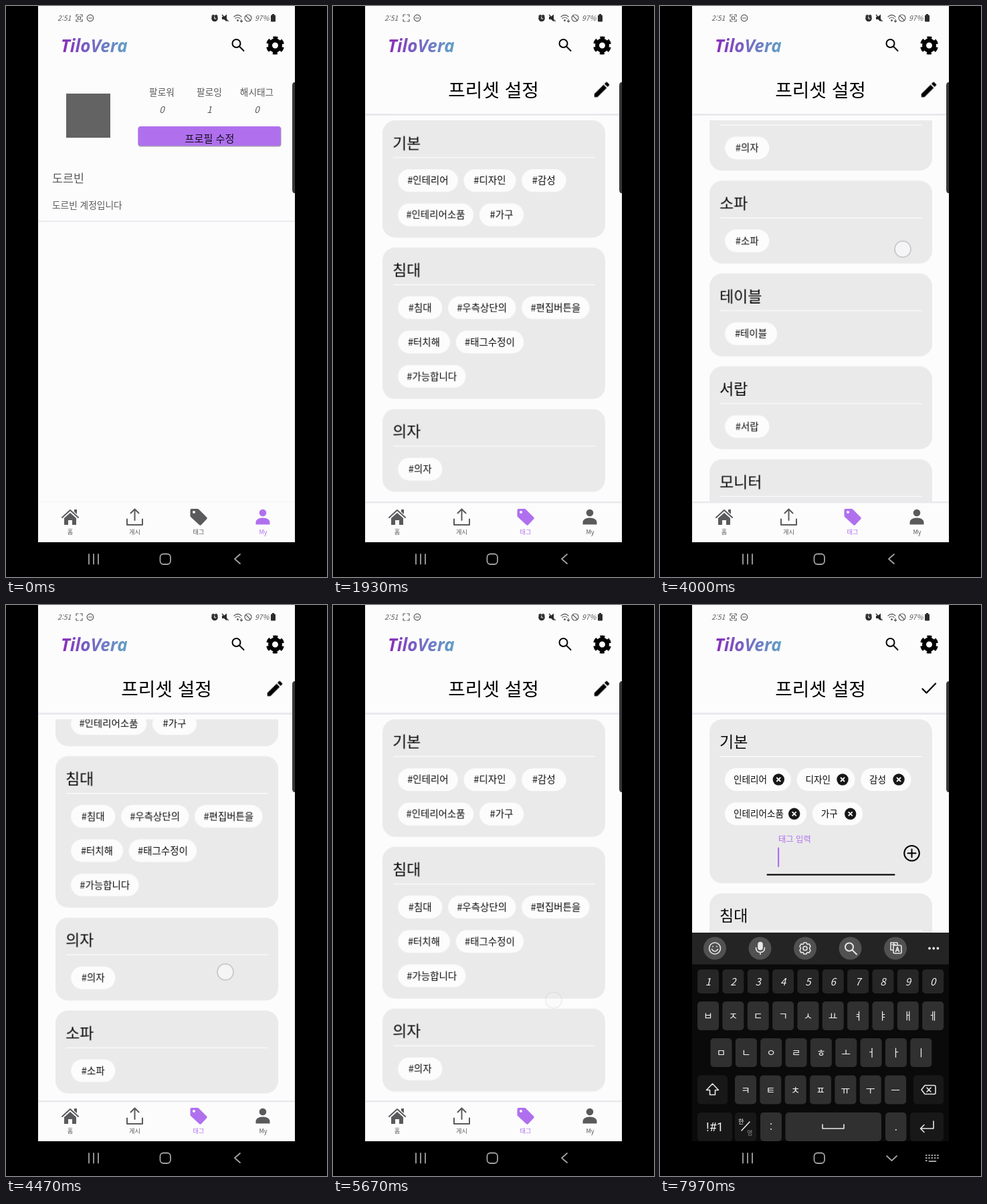
Animation, 480 px wide and 854 px high, one loop 8000 ms. Source, as an HTML page:

```html
<!DOCTYPE html>
<html lang="ko">
<head>
<meta charset="utf-8">
<title>Preset tags</title>
<style>
:root { --bg: #fcfcfd; --card: #eaeaea; --line: #e9e9ee; --gray: #5a5a5c; --ink: #0a0a0a; --purple: #b070ee; --pale: #e8e8e8; }
html, body { margin: 0; width: 100%; height: 100%; overflow: hidden; background: #000; }
svg { display: block; width: 100vw; height: 100vh; }
text { font-family: "Noto Sans CJK KR", "Noto Sans CJK", "Noto Sans", sans-serif; }
.mid { text-anchor: middle; }
.line { fill: none; stroke: currentColor; stroke-width: 2; stroke-linecap: round; stroke-linejoin: round; }
.gray { color: var(--gray); fill: var(--gray); }
.brand { font: italic 700 26px "Open Sans", sans-serif; }
.s9 { font-size: 9.2px; }
.s12 { font-size: 12.3px; }
.s14 { font-size: 13.7px; }
.s15 { font-size: 15.2px; }
.s17 { font-size: 17.4px; }
.s28 { font-size: 27.8px; }
.chip { font-size: 14.5px; }
.edit .chip { font-size: 13.6px; }
.name { font-size: 23px; }
.s28, .name { font-weight: 500; }
.num { font-style: italic; }
.key { font-size: 15px; text-anchor: middle; }
.tab { fill: currentColor; color: var(--gray); }

/* hard switches */
.profile, .preset, .view, .editing, .late, .early, .tag, .my { animation: 8s step-end infinite; }
.profile { animation-name: leave; }
.preset { animation-name: enter; }
.view { animation-name: viewOut; }
.editing { animation-name: editIn; }
.early { animation-name: navOut; }
.late { animation-name: navIn; }
.tag { animation-name: tabOn; }
.my { animation-name: tabOff; }
.rec { animation: rec 1s step-end infinite; }
@keyframes leave { 0% { opacity: 1 } 8%, 100% { opacity: 0 } }
@keyframes enter { 0% { opacity: 0 } 8%, 100% { opacity: 1 } }
@keyframes viewOut { 0% { opacity: 1 } 95%, 100% { opacity: 0 } }
@keyframes editIn { 0% { opacity: 0 } 95%, 100% { opacity: 1 } }
@keyframes navOut { 0% { opacity: 1 } 97%, 100% { opacity: 0 } }
@keyframes navIn { 0% { opacity: 0 } 97%, 100% { opacity: 1 } }
@keyframes tabOn { 0% { color: var(--gray) } 8%, 100% { color: var(--purple) } }
@keyframes tabOff { 0% { color: var(--purple) } 8%, 100% { color: var(--gray) } }
@keyframes rec { 0% { opacity: 1 } 43% { opacity: 0 } 95%, 100% { opacity: 1 } }

.scroll { animation: scroll 8s linear infinite; }
@keyframes scroll {
  0%, 35% { transform: translateY(0) }
  38% { transform: translateY(-40px) }
  40.875% { transform: translateY(-110px) }
  42.5% { transform: translateY(-205px) }
  44.5% { transform: translateY(-310px) }
  48% { transform: translateY(-404px) }
  50% { transform: translateY(-480px) }
  50.5% { transform: translateY(-496px) }
  51.5% { transform: translateY(-484px) }
  53.5% { transform: translateY(-330px) }
  55.875% { transform: translateY(-136px) }
  57% { transform: translateY(-55px) }
  59%, 100% { transform: translateY(0) }
}
.stretch { transform-origin: 0 171px; animation: stretch 8s linear infinite; }
@keyframes stretch {
  0%, 66.5% { transform: scaleY(1) }
  69% { transform: scaleY(1.012) }
  70.875% { transform: scaleY(1.002) }
  71.5%, 100% { transform: scaleY(1) }
}
.touch { opacity: 0; animation: touch 8s linear infinite; }
@keyframes touch {
  0%, 5.8% { transform: translate(288px, 766px); opacity: 0 }
  6%, 8% { transform: translate(288px, 766px); opacity: 1 }
  10% { transform: translate(288px, 766px); opacity: 0 }
  33% { transform: translate(367px, 475px); opacity: 0 }
  33.4%, 35% { transform: translate(367px, 475px); opacity: 1 }
  38% { transform: translate(366px, 435px); opacity: 1 }
  40.875% { transform: translate(364px, 365px); opacity: 1 }
  42.5% { transform: translate(363px, 270px); opacity: 1 }
  43.4% { transform: translate(363px, 260px); opacity: 0 }
  47.8% { transform: translate(361px, 440px); opacity: 0 }
  48% { transform: translate(361px, 440px); opacity: 1 }
  50% { transform: translate(363px, 364px); opacity: 1 }
  50.5% { transform: translate(363px, 348px); opacity: 1 }
  50.9% { transform: translate(363px, 345px); opacity: 0 }
  51.3% { transform: translate(318px, 200px); opacity: 0 }
  51.5% { transform: translate(318px, 200px); opacity: 1 }
  53.5% { transform: translate(322px, 354px); opacity: 1 }
  55.875% { transform: translate(328px, 548px); opacity: 1 }
  56.7% { transform: translate(330px, 600px); opacity: 1 }
  57.7% { transform: translate(330px, 604px); opacity: 0 }
  66% { transform: translate(322px, 400px); opacity: 0 }
  66.3% { transform: translate(322px, 400px); opacity: 1 }
  70% { transform: translate(330px, 588px); opacity: 1 }
  71.2% { transform: translate(330px, 592px); opacity: 0 }
  93.2% { transform: translate(402px, 125px); opacity: 0 }
  93.4%, 94.8% { transform: translate(402px, 125px); opacity: 1 }
  96% { transform: translate(402px, 125px); opacity: 0 }
  100% { transform: translate(402px, 125px); opacity: 0 }
}
.board { animation: rise 8s infinite; }
@keyframes rise {
  0%, 96% { transform: translateY(312px); animation-timing-function: cubic-bezier(.2, .7, .3, 1) }
  99%, 100% { transform: translateY(0) }
}
</style>
</head>
<body>
<svg viewBox="0 0 480 854">
  <defs>
    <linearGradient id="hue">
      <stop offset="0" stop-color="#8a2cb8"/>
      <stop offset=".45" stop-color="#7566c4"/>
      <stop offset="1" stop-color="#62a0c4"/>
    </linearGradient>
    <clipPath id="list"><rect x="48" y="171" width="384" height="571"/></clipPath>
    <g id="gear">
      <circle r="7.5" fill="none" stroke="currentColor" stroke-width="6"/>
      <circle r="11.7" fill="none" stroke="currentColor" stroke-width="3.8" stroke-dasharray="6.8 5.452" stroke-dashoffset="-2.73"/>
    </g>
    <g id="lens" class="line">
      <circle cx="-2.5" cy="-2.5" r="6"/><path d="M2 2l6.5 6.5"/>
    </g>
  </defs>

  <rect width="480" height="854"/>
  <rect x="48" width="384" height="802" fill="var(--bg)"/>

  <!-- status bar -->
  <g class="gray">
    <text x="77" y="21.5" font-size="10.5" class="num">2:51</text>
    <g class="line" style="stroke-width:1.2">
      <path d="M105 16v-3h3M111 13h3v3M114 20v3h-3M108 23h-3v-3"/>
      <rect class="rec" x="107.5" y="16" width="4" height="4"/>
      <circle cx="126" cy="18" r="4.8"/><path d="M123.5 18h5"/>
      <path d="M341 16q5.5-5 11 0M343 18.5q3.5-3 7 0M352 20v4m-1.5-1.5l1.5 1.5 1.5-1.5"/>
      <circle cx="362" cy="18" r="5"/><path d="M358.5 14.5l7 7"/>
    </g>
    <g fill="#2c2c2c">
      <circle cx="312" cy="18.5" r="4.8"/>
      <path d="M307 15l3-2.5 1 1-3 2.5zM317 15l-3-2.5-1 1 3 2.5zM323 16h3l4-3.5v11l-4-3.5h-3z"/>
      <rect x="396" y="13.5" width="7" height="10" rx="1"/><rect x="398" y="12" width="3" height="2"/>
    </g>
    <path d="M311.8 15.5v3.5h2.5" fill="none" stroke="var(--bg)"/>
    <path d="M323 13l9.5 10" stroke="#2c2c2c" stroke-width="1.3"/>
    <circle cx="346.5" cy="21.5" r="1.5"/>
    <text x="372" y="21.5" font-size="10.5" class="num">97%</text>
  </g>

  <!-- app bar -->
  <text class="brand" x="82" y="69" fill="url(#hue)">TiloVera</text>
  <use href="#lens" x="347" y="58.5"/>
  <use href="#gear" x="402.5" y="59"/>

  <g class="profile">
    <rect x="90" y="131" width="66" height="66" fill="#636363"/>
    <g class="gray mid s14">
      <text x="233" y="134">팔로워</text><text x="304" y="134">팔로잉</text><text x="375" y="134">해시태그</text>
      <g class="num"><text x="233" y="160">0</text><text x="304" y="160">1</text><text x="375" y="160">0</text></g>
    </g>
    <rect x="197.5" y="180.5" width="214" height="30" rx="4" fill="#a7a0ae"/>
    <rect x="197.5" y="180" width="213.5" height="29" rx="4" fill="var(--purple)"/>
    <text class="mid s15" x="304.5" y="203.5" fill="#140d20">프로필 수정</text>
    <g class="gray">
      <text class="s17" x="69" y="263.5">도르빈</text>
      <text class="s14" x="69" y="303">도르빈 계정입니다</text>
    </g>
    <rect x="48" y="321" width="384" height="2" fill="var(--line)"/>
    <rect x="48" y="741" width="384" height="1" fill="#f2f2f4"/>
  </g>

  <g class="preset">
    <text class="mid s28" x="240" y="135.5">프리셋 설정</text>
    <rect x="48" y="161" width="384" height="3" fill="var(--line)"/>
    <g clip-path="url(#list)">
      <g class="view"><g class="stretch"><g class="scroll" id="cards"></g></g></g>
      <g class="editing edit" id="forms"></g>
    </g>
    <path class="view" transform="translate(387 110) scale(1.25)" d="M3 17.25V21h3.75L17.81 9.94l-3.75-3.75zM20.71 7.04a1 1 0 0 0 0-1.41l-2.34-2.34a1 1 0 0 0-1.41 0l-1.83 1.83 3.75 3.75z"/>
    <g class="editing"><path class="line" style="stroke-width:2.3" d="M392.5 125.5l6 6 13.5-14"/></g>
    <rect x="48" y="741" width="384" height="2.5" fill="var(--line)"/>
  </g>

  <!-- tab bar -->
  <g class="mid s9">
    <g class="tab">
      <path d="M87 766l9-8 9 8v10h-6v-7h-6v7h-6zM102 753h4v7l-4-3.5z"/>
      <path class="line" d="M84 765l12-11 12 11"/>
      <text x="96" y="790.3">홈</text>
    </g>
    <g class="tab">
      <path class="line" d="M192.5 769v-16M186.5 758.5l6-6 6 6M181 767.5v8.5h23v-8.5"/>
      <text x="192.5" y="790.3">게시</text>
    </g>
    <g class="tab tag">
      <path d="M277.5 752h9q1 0 2 1l11.5 11.5q1.5 1.5 0 3l-8 8.5q-1.5 1.5-3 0l-12.5-11.5q-1-1-1-2v-8.5q0-2 2-2z"/>
      <circle cx="281" cy="757" r="2" fill="var(--bg)"/>
      <text x="288" y="790.3">태그</text>
    </g>
    <g class="tab my">
      <circle cx="384" cy="758" r="5.3"/>
      <path d="M373.5 775.5v-2.5q0-7.5 10.5-7.5t10.5 7.5v2.5z"/>
      <text x="384.5" y="790.3">My</text>
    </g>
  </g>

  <g class="board">
    <rect x="48" y="490" width="384" height="312" fill="#0a0a0a"/>
    <rect x="48" y="490" width="384" height="47.5" fill="#242424"/>
    <g id="keys"></g>
    <g class="line" color="#e8e8e8" style="stroke-width:1.6">
      <circle cx="82" cy="513.5" r="8.5"/><path d="M77.5 515q4.5 6 9 0M79 510.5v.5M85 510.5v.5"/>
      <rect x="147" y="504.5" width="6" height="11" rx="3" fill="var(--pale)"/><path d="M143.5 512.5q0 7 6.5 7t6.5-7M150 519.5v3"/>
      <circle cx="217" cy="513.5" r="3"/>
      <path d="M215 505h4l1 2.5 3-.5 2 3.5-1.5 3 1.5 3-2 3.5-3-.5-1 2.5h-4l-1-2.5-3 .5-2-3.5 1.5-3-1.5-3 2-3.5 3 .5z"/>
      <use href="#lens" x="285.5" y="514"/>
      <path d="M349 516h-4v-11h10v3M347 508h5M349.5 506v2M349 511q0-2 2-2h8q2 0 2 2v8q0 2-2 2h-8q-2 0-2-2zM352.5 518.5l2.5-7 2.5 7M353.5 516.5h3"/>
      <path style="stroke-width:3.8" d="M403 513.5h0M409.2 513.5h0M415.4 513.5h0"/>
      <path d="M78.5 716l-9 9.5h5v7h8v-7h5z"/>
      <path d="M396 718.5h14q2 0 2 2v9q0 2-2 2h-14l-5-6.5zM399 722l6 6M405 722l-6 6"/>
      <path d="M243 777v6h32v-6M409 772v11h-19M395 777.5l-5.5 5.5 5.5 5.5M122 786l12-13"/>
    </g>
  </g>

  <!-- system navigation -->
  <rect y="802" width="480" height="52"/>
  <g class="line" color="#a2a2a2" style="stroke-width:1.8">
    <path d="M124 820v14.5M131 820v14.5M138 820v14.5"/>
    <rect x="230.5" y="819.5" width="15.5" height="15.5" rx="5"/>
    <g class="early"><path d="M350 820l-8 7 8 7"/></g>
    <g class="late">
      <path d="M339 824l7.5 7 7.5-7"/>
      <path style="stroke-linecap:butt" stroke-dasharray="2.5 1.8" d="M397 823h21.5M397 827h21.5M397 831h3"/><path d="M402.5 832h10"/>
    </g>
  </g>

  <path d="M432 114q-4 0-4 5v156q0 5 4 5z" fill="#383838"/>
  <circle class="touch" r="12" fill="#fcfcfd" fill-opacity=".6" stroke="#c0c0c8" stroke-width="1.5"/>
</svg>

<script>
const presets = [
  ['기본', '인테리어 디자인 감성 인테리어소품 가구'],
  ['침대', '침대 우측상단의 편집버튼을 터치해 태그수정이 가능합니다'],
  ['의자', '의자'], ['소파', '소파'], ['테이블', '테이블'], ['서랍', '서랍'], ['모니터', '모니터']
];
const put = (id, html) => document.getElementById(id).innerHTML = html;
const rect = (x, y, w, h, r, fill) =>
  `<rect x="${x}" y="${y}" width="${w}" height="${h}" rx="${r}" fill="${fill}"/>`;
const text = (s, x, y, cls, fill = 'var(--ink)') =>
  `<text x="${x}" y="${y}" class="${cls}" fill="${fill}">${s}</text>`;

const closeIcon = (x, y) => `<circle cx="${x}" cy="${y}" r="8.7" fill="#181818"/>
  <path d="M${x - 3} ${y - 3}l6 6m0-6l-6 6" stroke="#fff" stroke-width="1.8"/>`;

function chip(tag, x, y, w, edit) {
  return rect(x, y, w, 34, 17, 'var(--bg)') + (edit
    ? text(tag, x + 13, y + 22, 'chip') + closeIcon(x + w - 18.5, y + 17)
    : text('#' + tag, x + w / 2, y + 22.3, 'chip mid'));
}

function inputRow(y, focused) {
  return text('태그 입력', 177, y + 9, 's12', 'var(--purple)') +
    (focused ? rect(176, y + 16.5, 2.2, 29, 0, 'var(--purple)') : '') +
    rect(159.5, y + 56, 192, 2.2, 1, 'var(--ink)') +
    `<g class="line"><circle cx="376.5" cy="${y + 25}" r="11.3"/>
     <path d="M370.5 ${y + 25}h12m-6-6v12"/></g>`;
}

function cardList(edit) {
  let top = 171, html = '';
  presets.forEach(([name, tags], i) => {
    let x = 97, y = top + 73, body = '';
    for (const tag of tags.split(' ')) {
      const w = (edit ? 52 : 43) + 11.7 * tag.length;
      if (x + w > 390) { x = 97; y += 51.3; }
      body += chip(tag, x, y, w, edit);
      x += w + 8.6;
    }
    if (edit) body += inputRow(y + 51, i === 0);
    const h = y - top + 51 + (edit ? 70 : 0);
    html += rect(74, top, 333, h, 19, 'var(--card)') +
      text(name, 89, top + 42, 'name') +
      rect(90, top + 55, 302, 1.3, 0, 'var(--bg)') + body;
    top += h + 14.9;
  });
  return html;
}
put('cards', cardList(false));
put('forms', cardList(true));

const dark = '#181818', light = '#f2f2f2';
const key = (label, x, y, w, h, fill = '#303030', cls = 'key') =>
  rect(x, y, w, h, 5, fill) + text(label, x + w / 2, y + h / 2 + 5.6, cls, light);
const keyRow = (labels, x, y, h, fill, cls) =>
  [...labels].map((c, i) => key(c, x + i * 37.35, y, 32, h, fill, cls)).join('');
put('keys',
  [82, 149.5, 217, 284.5, 352].map(x => `<circle cx="${x}" cy="513.5" r="17" fill="#515151"/>`).join('') +
  keyRow('1234567890', 56, 545, 36, '#262626', 'key num') +
  keyRow('ㅂㅈㄷㄱㅅㅛㅕㅑㅐㅔ', 56, 593, 43) +
  keyRow('ㅁㄴㅇㄹㅎㅗㅓㅏㅣ', 75.5, 648, 43) +
  key('', 56, 703.5, 45, 43, dark) + keyRow('ㅋㅌㅊㅍㅠㅜㅡ', 112, 703.5, 43) + key('', 379, 703.5, 45, 43, dark) +
  rect(56, 759, 52, 43, 5, dark) +
  `<text x="82" y="787" font-size="18" text-anchor="middle" fill="${light}" style="font-family:Roboto,sans-serif">!#1</text>` +
  key('', 112, 759, 32, 43, dark) +
  text('한', 117, 776, 's9', light) + text('영', 130, 793, 's9', '#8c8c8c') +
  key(':', 150, 759, 32, 43) + key('', 187.5, 759, 143.5, 43) + key('.', 337, 759, 31.5, 43) +
  key('', 374, 759, 50, 43, dark));
</script>
</body>
</html>
```
